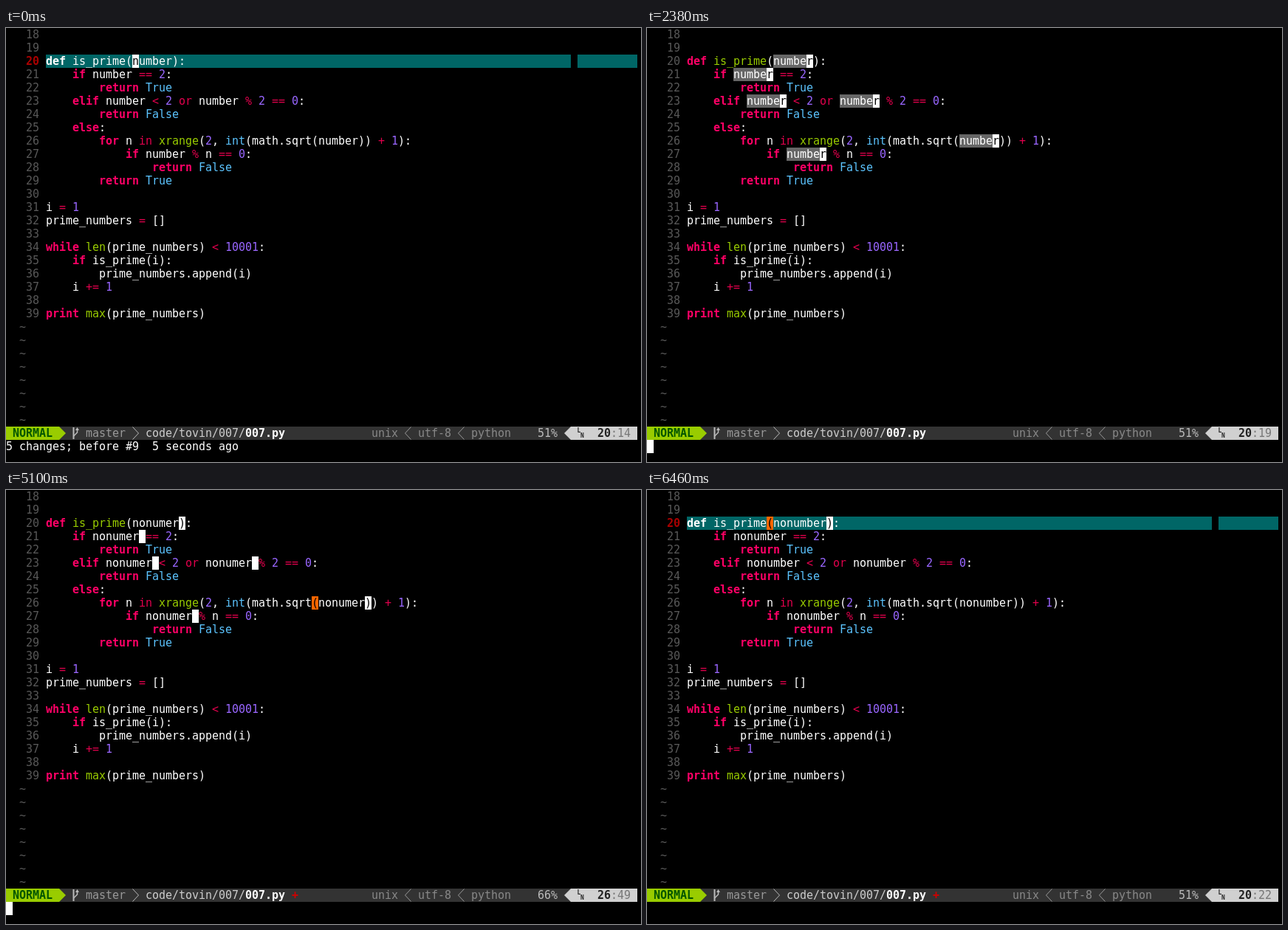
An HTML page with a canvas for the animation above (7820 ms loop, 860 by 588 pixels).

```html
<!DOCTYPE html>
<html lang="en">
<head>
<meta charset="utf-8">
<title>Multiple cursors</title>
<style>
html, body { margin: 0; width: 860px; height: 588px; overflow: hidden; background: #000; }
canvas { display: block; }
</style>
</head>
<body>
<canvas id="term" width="860" height="588"></canvas>
<script>
const CW = 9, CH = 18, LOOP = 7820, GUTTER = 6, FIRST = 18, BAR = 30;
const ctx = document.getElementById('term').getContext('2d', { alpha: false });

const C = {
  text: '#fff', key: '#ff0066', op: '#e0004c', num: '#9966ff', fn: '#99cc00',
  type: '#5cc4ff', dim: '#585858', sel: '#666', match: '#ff6600', line: '#006666',
  bar: '#333', light: '#d0d0d0', green: '#99cc00'
};

// "@" stands for the word being edited
const CODE = [
  '', '',
  'def is_prime(@):',
  '    if @ == 2:',
  '        return True',
  '    elif @ < 2 or @ % 2 == 0:',
  '        return False',
  '    else:',
  '        for n in xrange(2, int(math.sqrt(@)) + 1):',
  '            if @ % n == 0:',
  '                return False',
  '        return True',
  '',
  'i = 1',
  'prime_numbers = []',
  '',
  'while len(prime_numbers) < 10001:',
  '    if is_prime(i):',
  '        prime_numbers.append(i)',
  '    i += 1',
  '',
  'print max(prime_numbers)'
];

// sel: how many rows with the word are selected; extra: the match that gets skipped
const STEPS = [
  { t: 0, word: 'number', mode: 'start' },
  { t: 1020, word: 'number', mode: 'select', sel: 2 },
  { t: 1360, word: 'number', mode: 'select', sel: 3 },
  { t: 1700, word: 'number', mode: 'select', sel: 5 },
  { t: 2040, word: 'number', mode: 'select', sel: 5, extra: true },
  { t: 2380, word: 'number', mode: 'select', sel: 5 },
  { t: 3740, word: 'n', mode: 'type' },
  { t: 4080, word: 'no', mode: 'type' },
  { t: 4760, word: 'nonum', mode: 'type' },
  { t: 5100, word: 'nonumer', mode: 'type' },
  { t: 5780, word: 'nonumb', mode: 'type' },
  { t: 6120, word: 'nonumber', mode: 'type' },
  { t: 6460, word: 'nonumber', mode: 'end' }
];

const RULES = [
  [/^(def|if|return|elif|else|for|while|print)$/, C.key, true],
  [/^(or|in|[=<%+]+)$/, C.op],
  [/^(xrange|len|max)$/, C.fn],
  [/^(int|True|False)$/, C.type],
  [/^\d+$/, C.num]
];

function box(row, col, n, color) {
  ctx.fillStyle = color;
  ctx.fillRect(col * CW, row * CH, n * CW, CH);
}

function put(row, col, text, color, bold) {
  ctx.font = (bold ? 'bold ' : '') + '15px "DejaVu Sans Mono", monospace';
  ctx.fillStyle = color;
  [...text].forEach((ch, i) => {
    if (ch !== ' ') ctx.fillText(ch, (col + i) * CW, row * CH + 14);
  });
}

function path(points, color, fill, width = 1) {
  ctx.beginPath();
  points.forEach(([x, y]) => ctx.lineTo(x, y));
  ctx.lineWidth = width;
  ctx.fillStyle = ctx.strokeStyle = color;
  if (fill) ctx.fill(); else ctx.stroke();
}

function codeRow(row, text, plain) {
  for (const m of text.matchAll(/\w+|[=<%+]+|[^\s\w=<%+]+/g)) {
    const rule = RULES.find(r => r[0].test(m[0]));
    let color = rule ? rule[1] : C.text;
    if (text.startsWith('def ') && m[0] === 'is_prime') color = C.fn;
    put(row, GUTTER + m.index, m[0], plain ? C.text : color, rule && rule[2]);
  }
}

function mark(row, text, at, n, bg, fg) {
  box(row, GUTTER + at, n, bg);
  put(row, GUTTER + at, text.substr(at, n), fg);
}

function select(row, text, at, n) {
  mark(row, text, at, n - 1, C.sel, C.text);
  mark(row, text, at + n - 1, 1, '#fff', '#000');
}

function drawCode(s) {
  const idle = s.mode === 'start' || s.mode === 'end';
  const n = s.word.length;
  let seen = 0;
  CODE.forEach((src, row) => {
    const text = src.replaceAll('@', s.word);
    const active = idle && row === 2;
    if (active) {
      box(row, GUTTER, 79, C.line);
      box(row, 86, 9, C.line);
    }
    put(row, 3, String(FIRST + row), active ? '#aa0000' : C.dim, active);
    codeRow(row, text, active);

    const spots = [...src.matchAll(/@/g)].map((m, i) => m.index + i * (n - 1));
    if (spots.length) seen++;
    for (const at of spots) {
      if (s.mode === 'select' && seen <= s.sel) select(row, text, at, n);
      if (s.mode === 'type') mark(row, text, at + n, 1, '#fff', '#000');
      if (s.mode === 'type' && row === 8 || s.mode === 'end' && active)
        mark(row, text, at - 1, 1, C.match, '#000');
      if (active) mark(row, text, s.mode === 'end' ? at + n : at, 1, '#fff', '#000');
    }
    if (s.extra && row === 14) select(row, text, 6, 6);
  });
  for (let row = CODE.length; row < BAR; row++) put(row, 2, '~', C.dim);
}

function chevron(col, dir, color) {
  const x = col * CW + 4.5, y = BAR * CH;
  path([[x - dir * 4, y + 0.5], [x + dir * 4, y + 9], [x - dir * 4, y + 17.5]], color);
}

function drawBar(s) {
  const y = BAR * CH, typing = s.mode === 'type';
  const edited = typing || s.mode === 'end';
  const n = s.word.length;
  const col = { start: 14, select: 19, type: 42 + n, end: 14 + n }[s.mode];

  box(BAR, 0, 95, C.bar);
  box(BAR, 0, 8, C.green);
  path([[72, y], [81, y + 9], [72, y + 18]], C.green, true);
  put(BAR, 1, 'NORMAL', '#005500', true);

  path([[91.5, y + 1], [91.5, y + 17]], '#bbb', false, 2);
  path([[91.5, y + 13], [96.5, y + 8], [96.5, y + 3]], '#bbb', false, 1.5);
  path([[94, y + 5], [96.5, y + 1], [99, y + 5]], '#bbb', true);
  put(BAR, 12, 'master', '#999');
  chevron(19, 1, '#bbb');
  put(BAR, 21, 'code/tovin/007/', '#ccc');
  put(BAR, 36, '007.py', '#fff', true);
  if (edited) put(BAR, 43, '+', '#d00000', true);

  put(BAR, 55, 'unix', '#888');
  chevron(60, -1, '#999');
  put(BAR, 62, 'utf-8', '#888');
  chevron(68, -1, '#999');
  put(BAR, 70, 'python', '#888');
  put(BAR, 80, typing ? '66%' : '51%', '#bbb');

  box(BAR, 85, 10, C.light);
  path([[765, y], [756, y + 9], [765, y + 18]], C.light, true);
  ctx.font = 'bold 8px "DejaVu Sans Mono", monospace';
  ctx.fillStyle = '#222';
  ctx.fillText('L', 773.5, y + 8);
  ctx.fillText('N', 778, y + 15);
  put(BAR, 89, typing ? '26' : '20', '#222', true);
  put(BAR, 91, ':' + col, '#777');
}

function draw(s) {
  ctx.fillStyle = '#000';
  ctx.fillRect(0, 0, 860, 588);
  drawCode(s);
  drawBar(s);
  if (s.mode === 'start') put(BAR + 1, 0, '5 changes; before #9  5 seconds ago', C.text);
  else if (s.mode !== 'end') box(BAR + 1, 0, 1, '#fff');
}

let shown;
function tick() {
  const t = performance.now() % LOOP;
  const step = STEPS.findLast(s => s.t <= t);
  if (step !== shown) draw(shown = step);
  requestAnimationFrame(tick);
}
tick();
</script>
</body>
</html>
```
